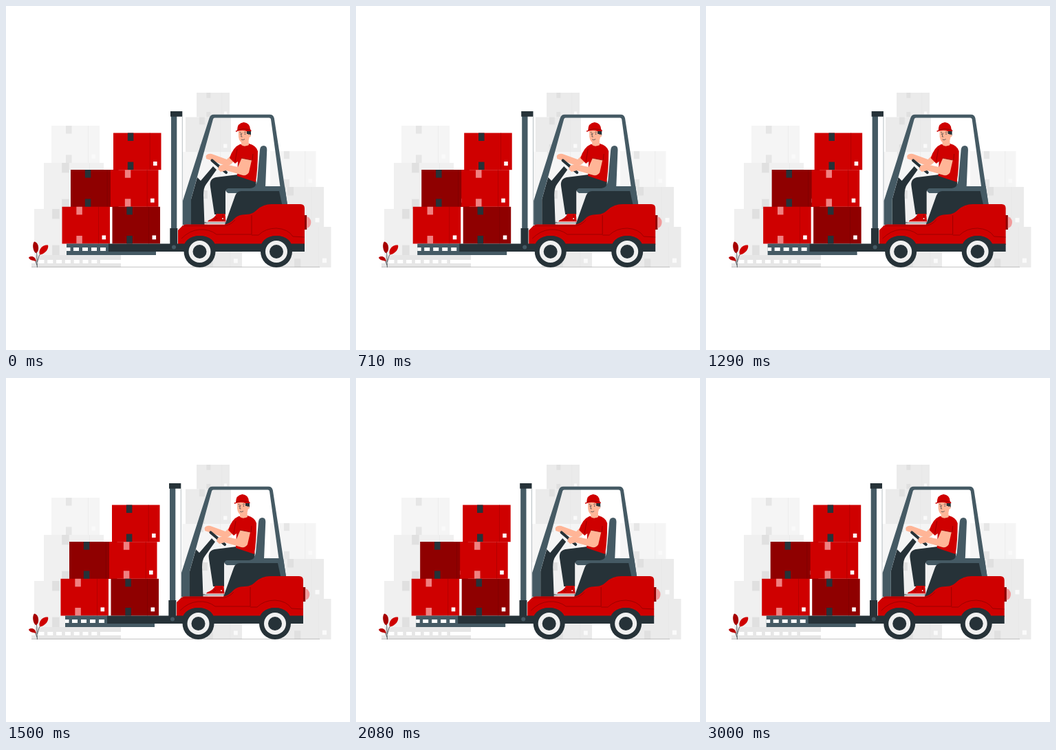
Animation of 500x500 px, one loop 3040 ms. Source, as an HTML page:

```html
<!DOCTYPE html>
<html lang="en">
<head>
<meta charset="utf-8">
<title>Forklift</title>
<style>
  html, body { margin: 0; width: 100%; height: 100%; overflow: hidden; background: #fff; }
  svg { display: block; width: 100%; height: 100%; }
  .red { fill: #cf0000; }
  .deep { fill: #8f0000; }
  .dark { fill: #263238; }
  .slate { fill: #455a64; }
  .skin { fill: #ffb597; }
  .pale { fill: #ebebeb; }
  .white { fill: #fff; }
  .line { fill: none; stroke: #263238; stroke-width: .7; }
  .seam { fill: none; stroke: #8f0000; stroke-width: .8; }
</style>
</head>
<body>
<svg viewBox="0 0 500 500">
  <g id="stock"></g>
  <path d="M37 379.4H456" stroke="#b5b5b5" stroke-width=".8"/>

  <g id="plant">
    <path class="line" d="M45.4 380C44.6 372 45.5 364 44 355M45.4 372Q47 363 53 355M45.2 377Q44 370 39 367" stroke="#777"/>
    <path fill="#a60000" d="M41 342.5C46 343 48.5 350 46.5 356Q45 359.500 43 359C39 356 37.800 346 41 342.500Z"/>
    <path class="red" d="M61 347.500C62.500 352 58 360 49.500 361.500C46.500 358 50 346.500 61 347.500Z"/>
    <path fill="#b80000" d="M33 365.500C37 362.500 43 364 43.800 371C40.500 370 34 370 33 365.500Z"/>
  </g>

  <g id="truck">
    <g transform="translate(-.89)">
      <g id="mast">
        <path class="white" d="M248 161h8.500v162h-8.500z"/>
        <path class="slate" d="M240 160h8.300v164h-8.300z"/>
        <path d="M256.300 161V322" stroke="#a3adb1" stroke-width=".8"/>
        <path class="dark" d="M239 153h17.300v7.700h-17.300zM238.300 323h11v24h-11z"/>
      </g>

      <g id="load"></g>

      <g id="seat">
        <path class="slate" d="M369 209Q369.500 203 374.500 203Q379.300 203 379.300 209L377 264Q376 272 368 272H323Q318.500 270 319 264H356Q364 262 365 254Z"/>
        <path class="slate" d="M374 262H405L409 289H374Z"/>
        <path class="dark" d="M318 318L333 276Q335.500 269 342 269H397L402 292L360 318Z"/>
      </g>

      <g id="driver">
        <path class="skin" d="M335 208L321 223L299 215Q293 214 290.500 218L291 222L297 224L319 232Q324 233 328 229L342 215Z"/>
        <path class="dark" d="M337 245L363 252Q366 264 355 265H323Q319 266 319 271V303H303L297 263Q295 251 305 249Z"/>
        <path class="red" d="M306 302H318.500L319.500 314H293Q293 311.500 297 310.500Q304 307 306 302Z"/>
        <path d="M292.500 314H319.500" stroke="#fff"/>
        <path class="seam" d="M304 307l3 2M302 309l3 2M315 303v10"/>
        <circle class="white" cx="315" cy="309" r=".9"/>
        <path class="red" d="M340 201L353 200Q364 203 366 211Q366 237 363 256L336 247L337 226L333 229L325 221Q330 205 340 201Z"/>
        <path class="skin" d="M342 193h10.500l.5 9q-6 3.500-11 0z"/>
        <path class="skin" d="M337.800 180H354V190Q353 199 346 199Q339 199 338 190Z"/>
        <path class="dark" d="M350 180H356V188L353.700 188.500L352 186L350 186Z"/>
        <circle class="skin" cx="354" cy="188.500" r="2"/>
        <path class="line" d="M343 184.500Q341.500 188 341.800 190H343.500M342 194Q344.500 195.500 347 193.500M339.500 183.500h2M346 183.500q1.500-.8 3 .1"/>
        <circle class="dark" cx="341" cy="186" r=".7"/>
        <circle class="dark" cx="347.400" cy="186" r=".7"/>
        <path class="red" d="M336 181Q336 170 345.500 169Q354.500 170 355 179L357 182H350Q342 179 334 183V181Z"/>
        <path class="seam" d="M336.500 180Q345 177 355 180"/>
      </g>

      <g id="cab">
        <path class="dark" d="M269 318V281L278 249L283 254L301 233L306 238L291 259Q287 264 287 275L288.500 318Z"/>
        <path d="M299.500 224.500L320 242" stroke="#263238" stroke-width="4.200" stroke-linecap="round"/>
        <path class="skin" d="M358 220L353 242Q350 247 344 246L320 239L312 241L308 237L310 232L318 230L337 234L344 218Z"/>
        <path class="red" d="M344 206Q352 200 360 206L358 224L342 221Z"/>
        <path class="seam" d="M336 208L333 226M342 221L357 224M358 224L359 215"/>
        <path class="slate" d="M295.500 163Q297 157.700 302 157.700H383.500Q388.500 157.700 389.800 163L409 288H402L385 164.500Q384.500 162.500 382.500 162.500H303.500Q301.500 162.500 301 164.500L277.500 250L269 281V318H257V283Z"/>
        <path d="M287 315H320" stroke="#263238" stroke-width="1.200"/>
        <path d="M291 314.200H318" stroke="#fff" stroke-width=".8"/>
      </g>

      <g id="body">
        <path class="deep" d="M433 304h4.200v21h-4.200z"/>
        <path fill="#f19a9a" d="M437.200 306Q443.300 308 443.300 314.500Q443.300 321 437.200 323Z"/>
        <path class="red" d="M250 347V326L257 319Q259 317.500 262 317.500H318Q326 316 332 309Q336 304.500 343 303.500L354 302.500Q360 301 365 296Q374 288 386 288H428Q434 288 434 294V347Z"/>
        <path class="seam" d="M257 319.500H318Q327 318 333 311M357 304V332H306Q296 324 281 325Q267 326 255 338M357 333H367Q377 323 393 323Q410 324 417 335L434 336"/>
        <path class="dark" d="M149 345.500H434V357H149zM256 357Q259 334 281.500 334Q304 334 307 357zM368 357Q371 334 393 334Q415 334 418 357z"/>
        <circle class="slate" cx="244" cy="350.500" r="3"/>
      </g>

      <g id="wheels"></g>
    </g>
  </g>
</svg>
<script>
const get = id => document.getElementById(id);
const rect = (x, y, w, h, fill) =>
  `<rect x="${x}" y="${y}" width="${w}" height="${h}" fill="${fill}"/>`;

// A carton: tape at top and bottom, a side seam and a label.
function carton(x, y, w, h, fill, tape, seam, label = '#fff') {
  const tapeX = x + .3 * w, tapeW = .122 * w, tapeH = .215 * h;
  return rect(x, y, w, h, fill) +
    rect(tapeX, y, tapeW, tapeH, tape) +
    rect(tapeX, y + h - tapeH, tapeW, tapeH, tape) +
    rect(x + .76 * w, y, .6, h, seam) +
    rect(x + .835 * w, y + .775 * h, .08 * w, .11 * h, label);
}

function gaps(x, y, w, h, step, count) {
  let out = '';
  for (let i = 0; i < count; i++) out += rect(x + i * step, y, w, h, '#fff');
  return out;
}

const LIGHT = '#f5f5f5', MID = '#f0f0f0', PALE = '#ebebeb', GREY = '#e0e0e0';
const RED = '#cf0000', DEEP = '#8f0000', DARK = '#263238', PINK = '#f08080', SLATE = '#455a64';

get('stock').innerHTML = [
  [66, 174, 70, 54, LIGHT],
  [55, 228, 87, 67, MID],
  [41, 295, 87, 67, MID],
  [277, 126, 48, 35.5, PALE],
  [261, 161.5, 66, 50.5, PALE],
  [256, 212, 73, 56, LIGHT],
  [262, 268, 73, 56, MID],
  [270, 324, 73, 56, PALE],
  [384, 211, 66.5, 52, LIGHT],
  [386, 263, 76, 58, PALE],
  [396, 321, 76.5, 59, PALE]
].map(b => carton(...b, b[4] === LIGHT ? '#e6e6e6' : GREY, '#e6e6e6', '#fafafa')).join('') +
  rect(42, 362, 125, 18, '#e6e6e6') + rect(37, 374, 130, 6, '#e6e6e6') +
  gaps(47.5, 369, 8, 5, 12.8, 7) + rect(137, 369, 30, 5, '#fff');

get('load').innerHTML =
  carton(94, 238, 69.5, 54, DEEP, DARK, '#7a0000') +
  carton(156, 184.5, 69.5, 53.7, RED, DARK, '#a30000') +
  carton(152, 238.2, 69.5, 53.6, RED, PINK, '#a30000') +
  carton(81.5, 291.8, 69.5, 53.7, RED, PINK, '#a30000') +
  carton(154.5, 291.8, 69.5, 53.7, DEEP, DARK, '#7a0000') +
  rect(88, 345.5, 62, 11, SLATE) + rect(88, 356, 130, 6, SLATE) +
  rect(88, 351, 5.5, 5, '#fff') + gaps(98, 351, 8, 5, 13, 4);

const discs = [[23, DARK], [16, '#f0f0f0'], [10, DARK]];
get('wheels').innerHTML = [281.5, 393].map(x => discs.map(([r, fill]) =>
  `<circle cx="${x}" cy="357" r="${r}" fill="${fill}"/>`).join('')).join('');

// Sideways shake: evenly spaced stops, linear between them.
const LOOP = 3040, STEPS = 73, LEAD = 540;
const stops = [0, -1, 2, -4, 4, -4, 4, -4, 2, -1, 0];
const truck = get('truck');

function shake(time) {
  const pos = (time + LEAD) % LOOP / LOOP * (stops.length - 1);
  const i = Math.floor(pos);
  return (stops[i] + (stops[i + 1] - stops[i]) * (pos - i)) * 2 / 3;
}

function draw() {
  const tick = LOOP / STEPS;
  const step = Math.floor((performance.now() % LOOP + 12) / tick) % STEPS;
  truck.setAttribute('transform', `translate(${shake(step * tick).toFixed(3)})`);
  requestAnimationFrame(draw);
}
draw();
</script>
</body>
</html>
```
